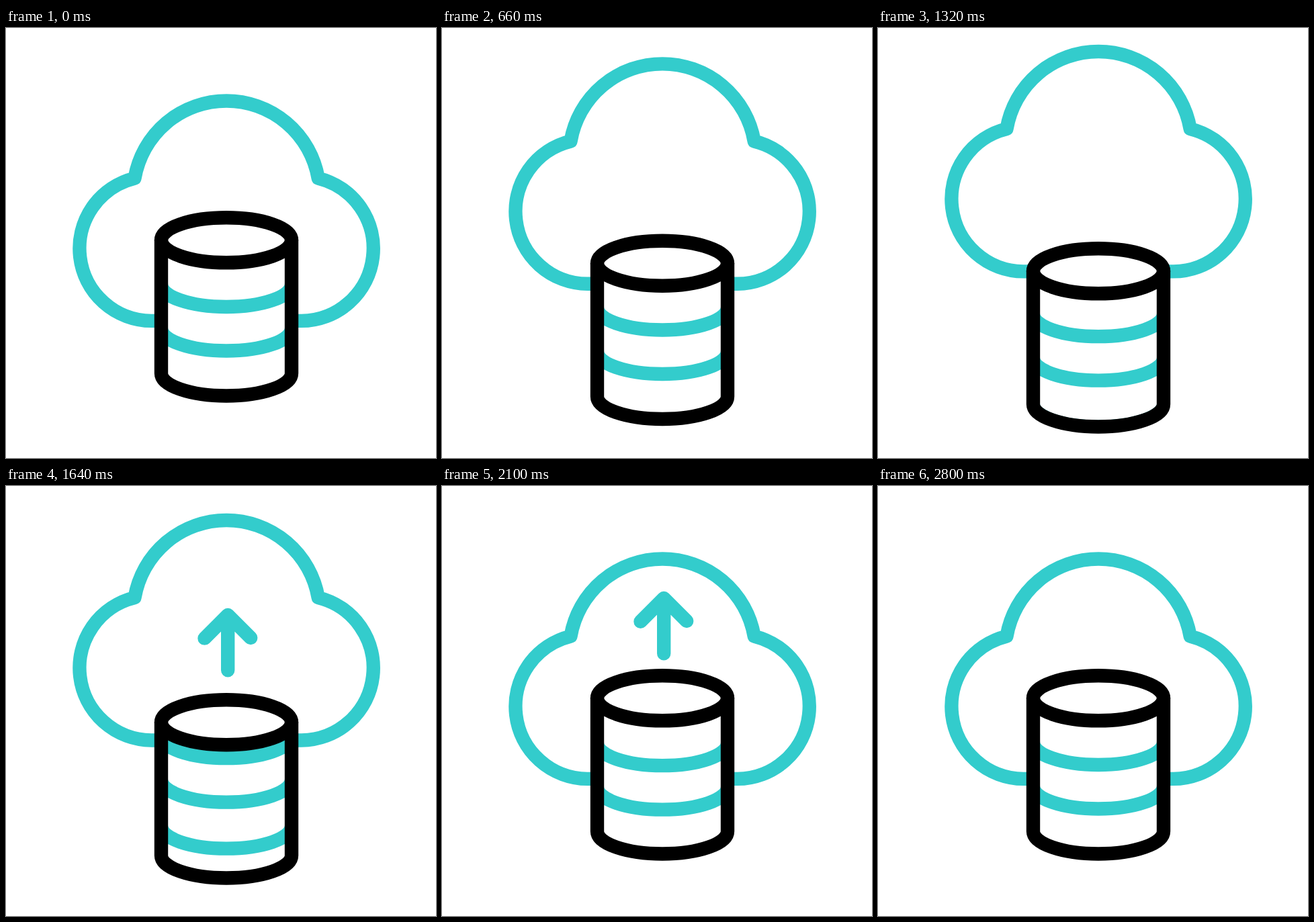
Recreate the animation shown at these times as an HTML page. Size 640 px wide and 640 px high, loop 3020 ms.

```html
<!DOCTYPE html>
<html lang="en">
<head>
<meta charset="utf-8">
<title>Cloud database</title>
<style>
  html, body { margin: 0; width: 100%; height: 100%; overflow: hidden; background: #fff; }
  svg { display: block; width: 100%; height: 100%; }
  .line { fill: none; stroke-width: 20.4; stroke-linecap: round; stroke-linejoin: round; }
  .teal { stroke: #3cc; }
  .black { stroke: #000; }
  .white { fill: #fff; }
</style>
</head>
<body>
<svg viewBox="0 0 640 640">
  <defs>
    <path id="body" d="M231 315.8V514A97 33.5 0 0 0 425 514V315.8A97 33.5 0 0 0 231 315.8Z"/>
    <path id="stripe" d="M231 0A97 33.5 0 0 0 425 0"/>
    <clipPath id="inside"><use href="#body"/></clipPath>
  </defs>
  <path id="cloud" class="line teal" d="M231 435.9H216.4A107.7 107.7 0 0 1 191.5 223.6A138.6 138.6 0 0 1 464.7 223.6A107.7 107.7 0 0 1 439.8 435.9H425"/>
  <path id="arrow" class="line teal" d="M330.2 0V82.3M295.5 34.7L330.2 0L364.2 34"/>
  <g id="cylinder">
    <use href="#body" class="white"/>
    <g clip-path="url(#inside)">
      <g id="stripes" class="line teal">
        <use href="#stripe" y="381.5"/>
        <use href="#stripe" y="447"/>
        <use href="#stripe" y="516"/>
        <use href="#stripe" y="581.5"/>
      </g>
    </g>
    <ellipse class="line black" style="fill:#fff" cx="328" cy="315.8" rx="97" ry="33.5"/>
    <path class="line black" d="M231 315.8V514A97 33.5 0 0 0 425 514V315.8"/>
  </g>
</svg>
<script>
const LOOP = 3020;
const SCROLL = 134.5; // two stripes and their gaps

const [cloud, arrow, cylinder, stripes] =
  ['cloud', 'arrow', 'cylinder', 'stripes'].map(id => document.getElementById(id));

const progress = (t, start, end) => Math.min(1, Math.max(0, (t - start) / (end - start)));

// Cubic Bezier easing with flat handles at x1 and x2
function ease(u, x1, x2) {
  let low = 0, high = 1;
  for (let i = 0; i < 24; i++) {
    const s = (low + high) / 2, r = 1 - s;
    if (3 * s * r * r * x1 + 3 * s * s * r * x2 + s * s * s < u) low = s;
    else high = s;
  }
  return low * low * (3 - 2 * low);
}
const easeOut = (t, start, end) => ease(progress(t, start, end), 0, 0.35);
const easeInOut = (t, start, end) => ease(progress(t, start, end), 0.65, 0.35);
const smooth = (t, start, end) => ease(progress(t, start, end), 1 / 3, 2 / 3);

const moveY = (node, y) => node.setAttribute('transform', `translate(0 ${y.toFixed(3)})`);

function draw(now) {
  const t = now % LOOP;
  const spread = easeOut(t, 200, 1200) - easeInOut(t, 1420, 2000);
  const drop = 46 * spread;
  const apex = 340 - 184 * easeInOut(t, 1200, 1640) + 20.4 * smooth(t, 1680, 2480);

  moveY(cloud, -73.5 * spread);
  moveY(cylinder, drop);
  moveY(stripes, -SCROLL * easeInOut(t, 1200, 2200));
  moveY(arrow, apex + drop);
  arrow.setAttribute('opacity', t < 1200 ? 0 : 1 - progress(t, 2400, 2800));
  requestAnimationFrame(() => draw(performance.now()));
}
draw(performance.now());
</script>
</body>
</html>
```
